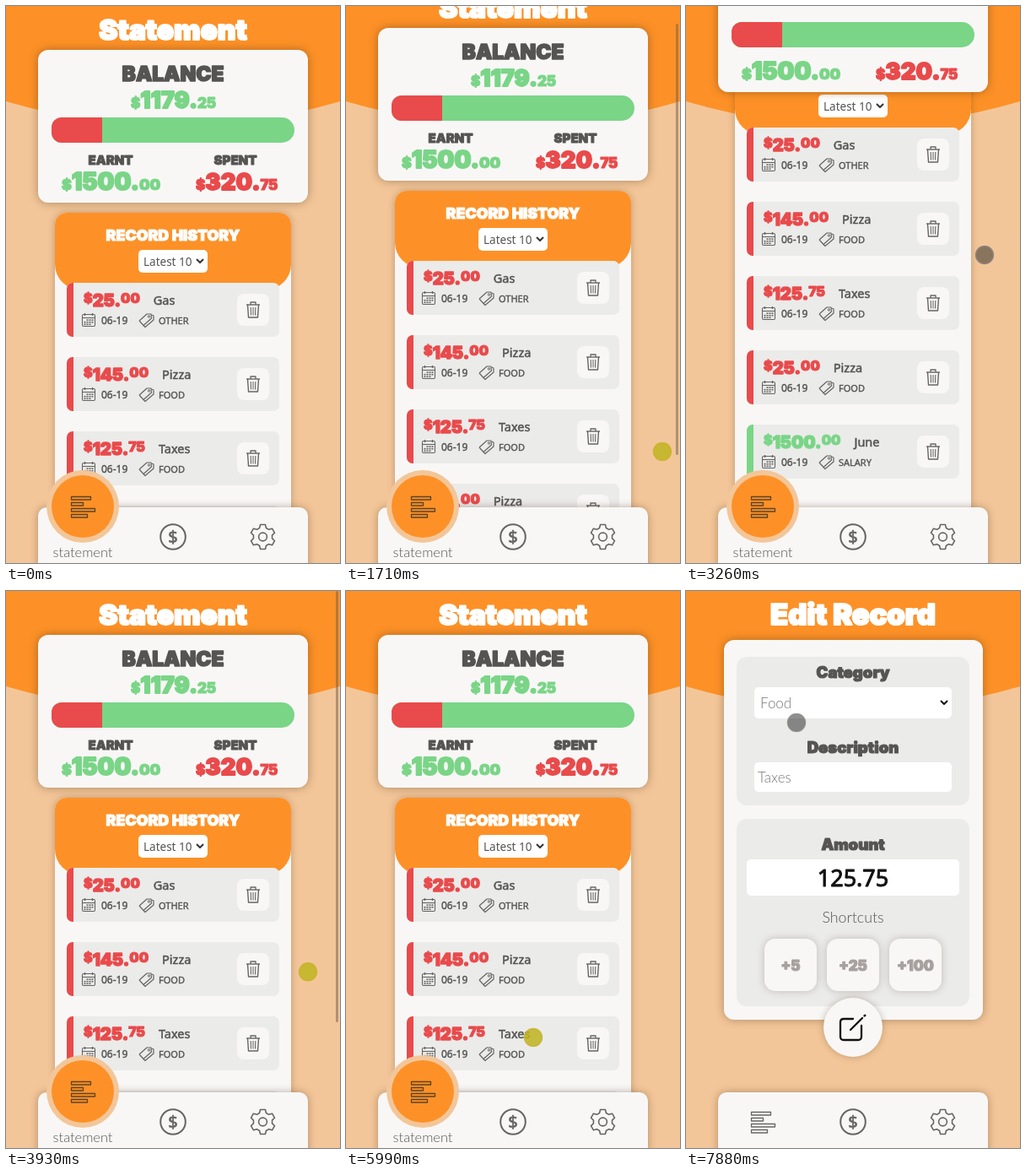
Write an HTML page with a canvas that moves like this. It is 396x660 px and loops after 8 s.

```html
<!DOCTYPE html>
<html lang="en">
<head>
<meta charset="utf-8">
<title>Budget statement</title>
<style>
html, body { margin: 0; width: 100%; height: 100%; overflow: hidden; background: #f3c699; }
canvas { display: block; width: 396px; height: 660px; }
</style>
</head>
<body>
<canvas id="stage"></canvas>
<script>
const W = 396, H = 660, LOOP = 8000;
const canvas = document.getElementById('stage');
const ctx = canvas.getContext('2d');
const dpr = window.devicePixelRatio || 1;
canvas.width = W * dpr;
canvas.height = H * dpr;

const C = {
  orange: '#fd9127', peach: '#f3c699', paper: '#f8f7f6', panel: '#ebebea',
  ink: '#555453', red: '#e94a4b', green: '#7ad587', white: '#ffffff', icon: '#666564'
};
const HEAVY = 'Inter, "Open Sans", sans-serif';
const PLAIN = '"Noto Sans", "Open Sans", sans-serif';
const LIGHT = 'Lato, "Open Sans", sans-serif';

const RECORDS = [
  ['25.', '00', 'Gas', 'OTHER'],
  ['145.', '00', 'Pizza', 'FOOD'],
  ['125.', '75', 'Taxes', 'FOOD'],
  ['25.', '00', 'Pizza', 'FOOD'],
  ['1500.', '00', 'June', 'SALARY', true]
];

// Bursts of activity: start, end, number of refreshes
const BURSTS = [
  [510, 1020, 4], [1540, 2560, 7], [2740, 3260, 4], [3780, 4790, 7],
  [4980, 5480, 4], [5990, 6690, 5], [7200, 7880, 5]
];
const POINTER = [
  [510, 384, 648], [680, 370, 610], [850, 358, 582], [1020, 371, 569],
  [1400, 371, 569], [1540, 373, 560], [1710, 375, 528], [1880, 377, 430],
  [2050, 378, 340], [2220, 377, 285], [2390, 377, 270], [2570, 377, 270],
  [3260, 354, 295], [3700, 354, 295], [3780, 355, 340], [3948, 358, 451],
  [4117, 358, 560], [4285, 345, 612], [4453, 305, 580], [4790, 230, 498],
  [4900, 230, 498], [5146, 185, 540], [5313, 162, 555], [5480, 222, 529],
  [7050, 222, 529], [7880, 131, 156]
];
const SCROLL = [
  [1540, 0], [1710, 26], [1880, 110], [2050, 166], [2220, 184],
  [3760, 184], [3930, 0]
];
const MAX_SCROLL = 184;
const PAGE_SWITCH = 6165;

const clamp = (v, lo, hi) => Math.max(lo, Math.min(hi, v));
const between = (t, a, b) => t >= a && t < b;

function refreshTime(t) {
  let out = 0;
  for (const [a, b, n] of BURSTS) {
    if (t < a) break;
    const step = (b - a) / (n - 1);
    out = Math.min(b, a + Math.floor((t - a) / step + 0.15) * step);
  }
  return out;
}

function track(keys, t) {
  if (t <= keys[0][0]) return keys[0].slice(1);
  for (let i = 1; i < keys.length; i++) {
    const p = keys[i - 1], q = keys[i];
    if (t <= q[0]) {
      const k = (t - p[0]) / (q[0] - p[0]);
      return p.slice(1).map((v, j) => v + (q[j + 1] - v) * k);
    }
  }
  return keys[keys.length - 1].slice(1);
}

function box(x, y, w, h, r, fill, blur = 0, shade = 0.3) {
  ctx.save();
  if (blur) {
    ctx.shadowColor = `rgba(70,45,20,${shade})`;
    ctx.shadowBlur = blur * dpr;
  }
  ctx.fillStyle = fill;
  ctx.beginPath();
  ctx.roundRect(x, y, w, h, r);
  ctx.fill();
  ctx.restore();
}

function disc(x, y, r, fill, blur = 0) {
  box(x - r, y - r, r * 2, r * 2, r, fill, blur);
}

function line(color, width, ...points) {
  ctx.strokeStyle = color;
  ctx.lineWidth = width;
  ctx.beginPath();
  points.forEach(([x, y], i) => i ? ctx.lineTo(x, y) : ctx.moveTo(x, y));
  ctx.stroke();
}

function ring(x, y, r, color, width) {
  ctx.strokeStyle = color;
  ctx.lineWidth = width;
  ctx.beginPath();
  ctx.arc(x, y, r, 0, Math.PI * 2);
  ctx.stroke();
}

// Fills text and thickens it by a share of its size
function write(str, x, y, size, font, color, align, extra = 0) {
  ctx.font = font;
  ctx.textAlign = align;
  ctx.fillStyle = ctx.strokeStyle = color;
  if (extra) {
    ctx.lineWidth = size * extra;
    ctx.strokeText(str, x, y);
  }
  ctx.fillText(str, x, y);
  return ctx.measureText(str).width;
}

const plain = (str, x, y, size, color, align = 'left') =>
  write(str, x, y, size, `${size}px ${PLAIN}`, color, align);
const medium = (str, x, y, size, color, align = 'left') =>
  write(str, x, y, size, `${size}px ${PLAIN}`, color, align, 0.035);
const light = (str, x, y, size, color, align = 'left') =>
  write(str, x, y, size, `300 ${size}px ${LIGHT}`, color, align);
const heavy = (str, x, y, size, color, align = 'center') =>
  write(str, x, y, size, `900 ${size}px ${HEAVY}`, color, align, 0.065);

function money(x, y, whole, cents, color, big, small, raise = 0) {
  x += heavy('$', x, y - raise, small, color, 'left');
  x += heavy(whole, x, y, big, color, 'left');
  return x + heavy(cents, x, y - raise, small, color, 'left');
}

function chevron(x, y, color) {
  line(color, 2, [x - 4, y - 2], [x, y + 2], [x + 4, y - 2]);
}

function background() {
  ctx.fillStyle = C.peach;
  ctx.fillRect(0, 0, W, H);
  ctx.fillStyle = C.orange;
  ctx.beginPath();
  ctx.moveTo(0, 0);
  ctx.lineTo(0, 113);
  ctx.quadraticCurveTo(198, 171, W, 113);
  ctx.lineTo(W, 0);
  ctx.fill();
}

function calendar(x, y) {
  ctx.strokeStyle = C.icon;
  ctx.lineWidth = 1.1;
  ctx.beginPath();
  ctx.roundRect(x + 0.5, y + 1.5, 15, 14, 1.5);
  ctx.stroke();
  line(C.icon, 1.1, [x, y + 5.5], [x + 16, y + 5.5]);
  for (const dx of [3.5, 12.5]) line(C.icon, 1.4, [x + dx, y], [x + dx, y + 3]);
  ctx.fillStyle = C.icon;
  for (let i = 1; i < 11; i++) {
    ctx.fillRect(x + 2.5 + (i % 4) * 3, y + 7.3 + Math.floor(i / 4) * 2.6, 2, 1.6);
  }
}

function tag(x, y) {
  line(C.icon, 1.2, [x + 1, y + 9], [x + 10, y + 1], [x + 15, y + 1],
    [x + 15.5, y + 6], [x + 6, y + 14.5], [x + 1, y + 9]);
  line(C.icon, 1.2, [x + 6, y + 14.5], [x + 8, y + 16.5], [x + 18, y + 8],
    [x + 18, y + 3], [x + 15.5, y + 2]);
  ring(x + 12.5, y + 4, 1.2, C.icon, 1);
}

function trash(x, y) {
  const c = C.icon;
  line(c, 1.4, [x - 8, y - 6], [x + 8, y - 6]);
  line(c, 1.3, [x - 3, y - 6], [x - 3, y - 9], [x + 3, y - 9], [x + 3, y - 6]);
  line(c, 1.4, [x - 6.5, y - 6], [x - 5.5, y + 9], [x + 5.5, y + 9], [x + 6.5, y - 6]);
  for (const dx of [-2.8, 0, 2.8]) line(c, 1.1, [x + dx, y - 3], [x + dx * 0.9, y + 6.5]);
}

function record([whole, cents, name, kind, income], y) {
  const color = income ? C.green : C.red;
  ctx.save();
  ctx.beginPath();
  ctx.roundRect(72, y, 252, 64, 7);
  ctx.clip();
  ctx.fillStyle = C.panel;
  ctx.fillRect(72, y, 252, 64);
  ctx.fillStyle = color;
  ctx.fillRect(72, y, 8, 64);
  ctx.restore();
  const end = money(92, y + 28, whole, cents, color, 20.3, 16, 4);
  medium(name, end + 16, y + 26, 14.5, C.ink);
  calendar(90, y + 36);
  medium('06-19', 113, y + 49, 12, C.ink);
  tag(157, y + 36);
  medium(kind, 181, y + 49, 11, C.ink);
  box(274, y + 13, 38, 38, 8, C.paper);
  trash(293, y + 32);
}

function history(s) {
  const y = 245 - s;
  box(58, y, 280, 560, 14, C.paper, 9);
  box(58, y, 280, 91, [14, 14, 30, 30], C.orange);
  heavy('RECORD HISTORY', 198, y + 33, 17.8, C.white);
  box(157, y + 44, 82, 27, 5, C.white);
  plain('Latest 10', 163, y + 63, 13.5, C.ink);
  chevron(230, y + 57, '#333');
  RECORDS.forEach((r, i) => record(r, y + 83 + i * 88));
}

// Once stuck to the top edge, the card folds its headings away
function balance(s) {
  const top = Math.max(52 - s, -61);
  const folded = s > 113;
  const sums = top + (folded ? 148 : 166);
  box(38, top, 320, sums - top + 15, 12, C.paper, 11, 0.42);
  box(54, top + 80, 288, 30, [12, 15, 15, 12], C.green);
  box(54, top + 80, 60, 30, [12, 0, 0, 12], C.red);
  if (!folded) {
    heavy('BALANCE', 198, top + 37, 24.4, C.ink);
    money(148, top + 69, '1179.', '25', C.green, 27, 17);
    heavy('EARNT', 124, top + 136, 15, C.ink);
    heavy('SPENT', 272, top + 136, 15, C.ink);
  }
  money(66, sums, '1500.', '00', C.green, 28, 17.8);
  money(225, sums, '320.', '75', C.red, 27.5, 17);
}

function statementPage(s) {
  heavy('Statement', 198, 40 - s, 33.4, C.white);
  history(s);
  balance(s);
}

function pencil() {
  ctx.lineCap = 'round';
  ctx.strokeStyle = '#111';
  ctx.lineWidth = 2.3;
  ctx.beginPath();
  ctx.moveTo(198, 507);
  ctx.lineTo(187, 507);
  ctx.quadraticCurveTo(183, 507, 183, 511);
  ctx.lineTo(183, 528);
  ctx.quadraticCurveTo(183, 532, 187, 532);
  ctx.lineTo(204, 532);
  ctx.quadraticCurveTo(208, 532, 208, 528);
  ctx.lineTo(208, 515);
  ctx.stroke();
  line('#111', 2.3, [195, 520], [209, 506]);
  line('#111', 2.6, [211.6, 503.4], [212.2, 502.8]);
  ctx.lineCap = 'butt';
}

function editPage() {
  heavy('Edit Record', 198, 39.5, 34.4, C.white);
  box(45, 58, 307, 450, 12, C.paper, 11, 0.4);
  box(60, 78, 276, 176, 12, C.panel);
  box(60, 270, 276, 222, 12, C.panel);

  heavy('Category', 198, 103, 18.5, C.ink);
  box(81, 114, 234, 37, 5, C.white);
  light('Food', 88, 139, 17, '#777');
  chevron(306, 132, '#111');
  heavy('Description', 198, 192, 18.5, C.ink);
  box(81, 203, 234, 35, 5, C.white);
  light('Taxes', 85, 227, 17, '#777');

  heavy('Amount', 198, 307, 18.5, C.ink);
  box(72, 318, 252, 43, 5, C.white);
  medium('125.75', 198, 350, 27, '#111', 'center');
  light('Shortcuts', 198, 393, 17.8, C.ink, 'center');
  ['+5', '+25', '+100'].forEach((label, i) => {
    const x = 93 + i * 74;
    box(x, 412, 62, 62, 13, C.paper, 10, 0.25);
    heavy(label, x + 31, 450, 17, '#a8a09f');
  });
  disc(198, 517, 35, C.paper, 9);
  pencil();
}

function bars(y, color, fill) {
  ctx.strokeStyle = color;
  ctx.lineWidth = 1.3;
  ctx.fillStyle = fill;
  [24, 15, 29, 20].forEach((w, i) => {
    ctx.beginPath();
    ctx.rect(77.5, y - 11.5 + i * 7, w - 1, 3.5);
    ctx.fill();
    ctx.stroke();
  });
}

function gear(x, y) {
  const points = [];
  for (let i = 0; i < 6; i++) {
    const mid = i * Math.PI / 3 - Math.PI / 2;
    for (const [d, r] of [[-0.36, 11.2], [-0.2, 14.8], [0.2, 14.8], [0.36, 11.2]]) {
      points.push([x + Math.cos(mid + d) * r, y + Math.sin(mid + d) * r]);
    }
  }
  line(C.icon, 1.6, ...points, points[0], points[1]);
  ring(x, y, 4.9, C.icon, 1.6);
}

// k runs from 0 (statement selected) to 1 (nothing selected)
function nav(k) {
  box(38, 594, 320, 80, 10, C.paper, 10, 0.38);
  const active = clamp(1 - k / 0.44, 0, 1);
  const y = 593 + 36 * k;
  if (active > 0) {
    ctx.globalAlpha = active;
    disc(91, y, 43, C.peach);
    disc(91, y, 37, C.orange);
    light('statement', 91, 653, 16.4, C.ink, 'center');
    ctx.globalAlpha = 1;
  }
  if (active > 0) bars(y, '#5c4426', 'transparent');
  else if (k < 1) bars(y, '#8a8988', '#c4c3c2');
  else bars(y, C.icon, 'transparent');
  ring(198, 629, 14.8, C.icon, 2);
  medium('$', 198, 636, 20, C.icon, 'center');
  gear(304.5, 629);
}

function status() {
  box(0, 642, 130, 18, [0, 4, 0, 0], '#c8e9bf');
  plain('Waiting for localhost...', 2, 658, 10.8, '#333');
}

function scrollbar(s) {
  box(391, s / MAX_SCROLL * 149, 3, 511, 1.5, 'rgba(110,95,85,.5)');
}

function pointer(t) {
  const [x, y] = track(POINTER, t);
  const down = between(t, 1540, 2380) || between(t, 3780, 4440) || between(t, 5990, 6160);
  disc(x, y, 11, down ? 'rgba(190,180,30,.85)' : 'rgba(40,40,40,.52)');
  ring(x, y, 10.6, down ? 'rgba(205,175,45,.5)' : 'rgba(150,145,140,.6)', 1.4);
}

function draw(now) {
  const t = refreshTime(now % LOOP);
  const s = track(SCROLL, t)[0];
  const k = clamp((t - PAGE_SWITCH) / 395, 0, 1);
  ctx.setTransform(dpr, 0, 0, dpr, 0, 0);
  ctx.lineJoin = 'round';
  background();
  if (t >= PAGE_SWITCH) editPage();
  else statementPage(s);
  nav(k);
  if (between(t, PAGE_SWITCH, 6600)) status();
  if (between(t, 1540, 2550) || between(t, 3780, 4700)) scrollbar(s);
  if (t >= 510) pointer(t);
}

const begun = performance.now();
function frame() {
  draw(performance.now() - begun);
  requestAnimationFrame(frame);
}
frame();
</script>
</body>
</html>
```
